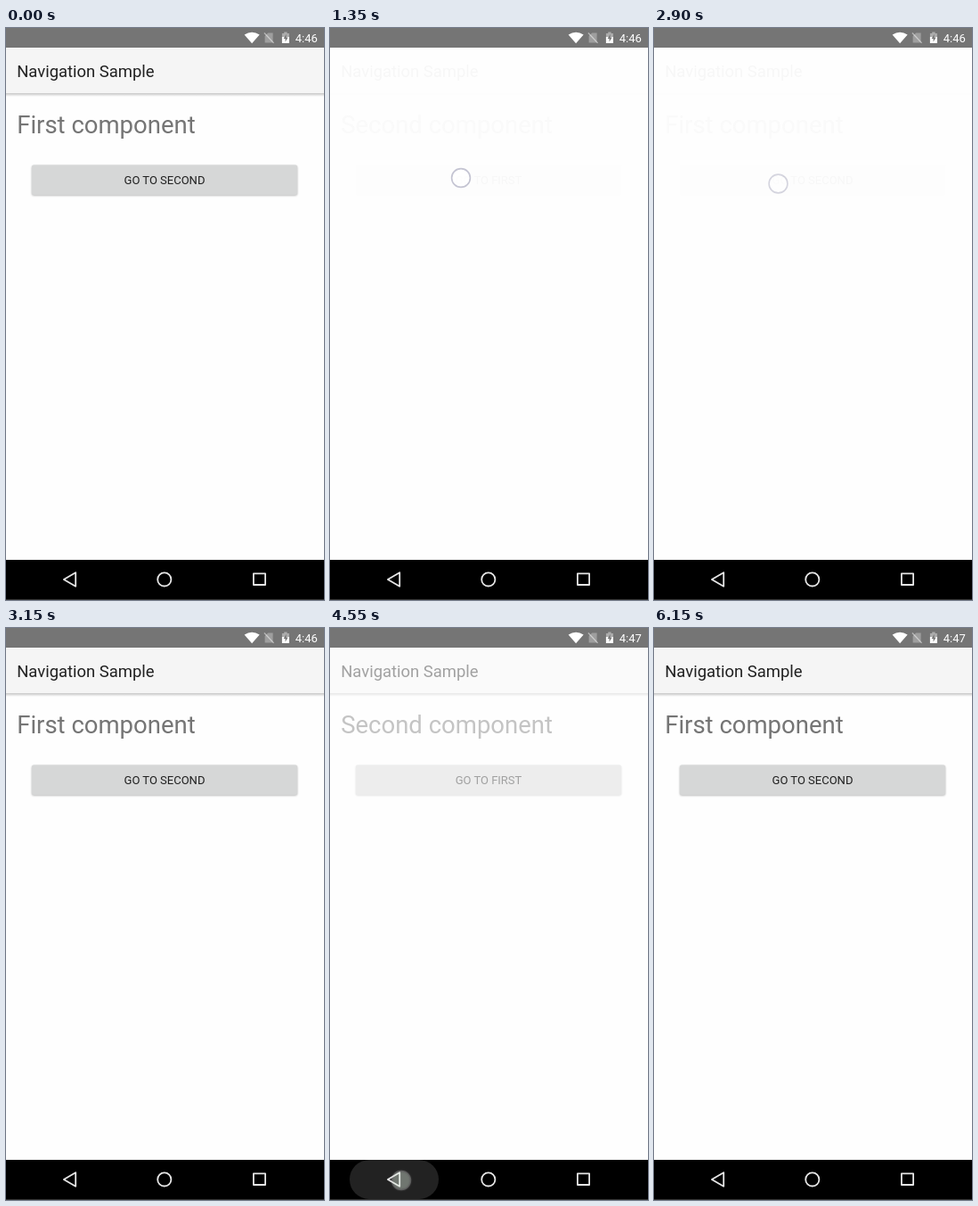
Animation of 357 by 641 pixels, one loop 7250 ms. Source, as an HTML page:

```html
<!DOCTYPE html>
<html lang="en">
<head>
<meta charset="utf-8">
<title>Navigation Sample</title>
<style>
  html, body { margin: 0; height: 100%; overflow: hidden; background: #fefefe; }
  svg { display: block; width: 100vw; height: 100vh; }
  text { font-family: Roboto, sans-serif; }
</style>
</head>
<body>
<svg viewBox="0 0 357 641">
  <defs>
    <linearGradient id="shade" x2="0" y2="1">
      <stop stop-color="#000" stop-opacity=".22"/>
      <stop offset="1" stop-color="#000" stop-opacity="0"/>
    </linearGradient>
    <filter id="blur" x="-5%" y="-30%" width="110%" height="160%">
      <feGaussianBlur stdDeviation=".9"/>
    </filter>
    <filter id="glow" x="-50%" y="-50%" width="200%" height="200%">
      <feGaussianBlur stdDeviation="1.5"/>
    </filter>
  </defs>
  <rect width="357" height="641" fill="#fefefe"/>

  <g id="page">
    <rect y="73" width="357" height="4" fill="url(#shade)"/>
    <rect y="22" width="357" height="51" fill="#f5f5f5"/>
    <text x="12.2" y="55" font-size="18.45" fill="#212121">Navigation Sample</text>
    <text id="heading" x="12.2" y="118" font-size="27.5" fill="#757575"></text>
    <rect x="29" y="154.5" width="298" height="33.3" rx="2" opacity=".3" filter="url(#blur)"/>
    <rect x="29" y="153.6" width="298" height="33.5" rx="2" fill="#d6d7d7"/>
    <rect id="press" x="29" y="153.6" width="298" height="33.5" rx="2"/>
    <text id="label" x="178" y="175.2" font-size="13" text-anchor="middle" fill="#212121"></text>
  </g>

  <!-- status bar -->
  <rect width="357" height="22" fill="#757575"/>
  <g fill="#fff" transform="translate(-.4 0)">
    <path d="M276.5 17.2L268 7.6Q276.5 1.8 285 7.6Z"/>
    <path d="M294.5 5.5H300V16.5H291V9Z" opacity=".3"/>
    <path d="M290.3 5.5L301 16.8" stroke="#fff" stroke-width="1.2" opacity=".5"/>
    <path d="M312.6 4.5H316V6H318.3V17H310.3V6H312.6Z" opacity=".4"/>
    <path d="M310.3 10H318.3V17H310.3Z"/>
    <path d="M315 7L312 12H314V15.5L317 10.6H315Z" fill="#757575"/>
    <text id="clock" x="325.2" y="16" font-size="13"></text>
  </g>

  <!-- navigation bar -->
  <rect y="596" width="357" height="45"/>
  <rect y="640" width="357" height="1" fill="#333"/>
  <rect id="ripple" y="596" height="44" rx="22" fill="#fff"/>
  <g fill="none" stroke="#e6e6e6" stroke-width="1.8" stroke-linejoin="round">
    <path d="M64.9 618L78.2 610.3V625.7Z"/>
    <circle cx="177.8" cy="617.9" r="7.6"/>
    <rect x="277.9" y="611.3" width="13.2" height="12.7"/>
  </g>

  <g id="spot">
    <circle id="halo" r="10.5" fill="#fff" opacity=".35" filter="url(#glow)"/>
    <circle id="disc" r="9.8"/>
    <circle id="ring" r="10.4" fill="none" stroke-width="1.6" stroke-opacity=".45"/>
  </g>
</svg>
<script>
const LOOP = 7250, STEP = 50, OUT = 123, IN = 205;
const el = id => document.getElementById(id);
const set = (id, attrs) => {
  for (const k in attrs) el(id).setAttribute(k, attrs[k]);
};
const ramp = (t, start, length) => Math.min(1, Math.max(0, (t - start) / length));

// down/up: finger; gone: ripple has faded; leave: old page starts to fade
const taps = [
  { x: 147, y: 168, down: 850, up: 1300, gone: 1450, leave: 1220 },
  { x: 139.5, y: 174.5, down: 2350, up: 2790, gone: 2970, leave: 2770 },
  { x: 80, y: 619, down: 4110, up: 4400, gone: 4850, leave: 4341, back: true, fill: '#d5e8d5' },
  { x: 79, y: 619, down: 5210, up: 5790, gone: 6150, leave: 5790, back: true }
];

function draw(t) {
  const done = taps.filter(p => t >= p.leave + OUT).length;
  const second = done % 2 === 1;
  let opacity = 1;
  for (const p of taps) {
    if (t < p.leave) continue;
    const enter = p.leave + OUT;
    opacity = t < enter ? 1 - ramp(t, p.leave, OUT) : ramp(t, enter, IN);
  }
  set('page', { opacity });
  el('heading').textContent = second ? 'Second component' : 'First component';
  el('label').textContent = second ? 'GO TO FIRST' : 'GO TO SECOND';
  el('clock').textContent = t < 3750 ? '4:46' : '4:47';

  const tap = taps.find(p => t >= p.down && t < p.gone + 150);
  set('spot', { opacity: 0 });
  set('press', { opacity: 0 });
  set('ripple', { opacity: 0 });
  if (!tap) return;

  const { x, y, down, up, gone, back } = tap;
  const fade = 1 - ramp(t, up, gone - up);
  const lift = back ? up + 60 : up;
  const shown = ramp(t, down, 80) * (1 - ramp(t, lift, 250));
  set('spot', { opacity: shown, transform: `translate(${x} ${y})` });
  set('disc', { fill: tap.fill || '#fff', 'fill-opacity': back ? .45 : .9 });
  set('halo', { opacity: back ? .35 : 0 });
  set('ring', { stroke: back ? '#c8c8c8' : '#606088' });
  if (back) {
    const grow = 1 - (1 - ramp(t, down, 340)) ** 3;
    const w = 44 + 56 * grow;
    set('ripple', { x: 72 - w / 2, width: w, opacity: .2 * fade });
  } else if (t < tap.leave + OUT) {
    set('press', { opacity: .09 * ramp(t, down + 60, 150) * fade });
  }
}

function frame(now) {
  draw(Math.floor(now % LOOP / STEP) * STEP);
  requestAnimationFrame(frame);
}
draw(0);
requestAnimationFrame(frame);
</script>
</body>
</html>
```
